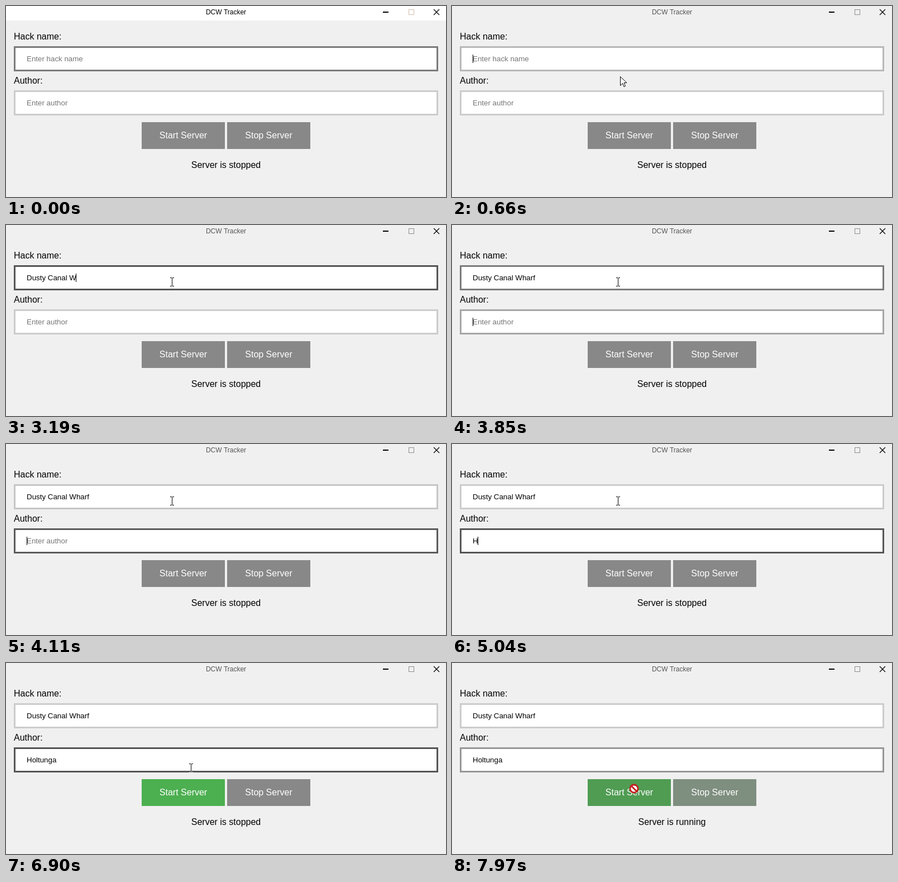
Recreate the animation shown at these times as an HTML page with a canvas. Size 788 by 342 pixels, loop 8 s.

```html
<!DOCTYPE html>
<html lang="en">
<head>
<meta charset="utf-8">
<title>DCW Tracker</title>
<style>
  html, body { margin: 0; width: 100%; height: 100%; overflow: hidden; background: #f0f0f0; }
  canvas { display: block; }
</style>
</head>
<body>
<canvas id="stage" width="788" height="342"></canvas>
<script>
const ctx = document.getElementById('stage').getContext('2d', { alpha: false });
const LOOP = 8000, FADE = 500, BLINK = 530;
const ENABLED = 5040, RUNNING = 7900;

const LIGHT = [204, 204, 204], DARK = [85, 85, 85];
const GRAY = [136, 136, 136], GREEN = [76, 175, 80], HOVER = [69, 160, 73];

// Colour tracks: a first colour, then [start, colour] transitions.
// Typing: one character every `step` ms from `first` on.
const fields = [
  {
    y: 72, label: 'Hack name:', hint: 'Enter hack name', text: 'Dusty Canal Wharf',
    focus: 660, blur: 3745, first: 1790, step: 112,
    border: [DARK, [-105, LIGHT], [590, DARK], [3745, LIGHT]]
  },
  {
    y: 151, label: 'Author:', hint: 'Enter author', text: 'Holtunga',
    focus: 3780, blur: 7810, first: ENABLED, step: 132,
    border: [LIGHT, [3745, DARK], [7810, LIGHT]]
  }
];
const buttons = [
  { x: 243, label: 'Start Server', fill: [GRAY, [ENABLED, GREEN], [6960, HOVER], [RUNNING, GRAY]] },
  { x: 396, label: 'Stop Server', fill: [GRAY, [RUNNING, GREEN]] }
];
// Pointer moves: start, end, from, to
const moves = [
  { start: 70, end: 800, from: [335, 350], to: [297, 102] },
  { start: 6400, end: 7200, from: [297, 102], to: [347, 228] },
  { start: 7260, end: 7500, from: [347, 228], to: [326, 225] }
];

const clamp = p => Math.min(1, Math.max(0, p));
const mix = (a, b, k) => a.map((v, i) => v + (b[i] - v) * k);

// CSS "ease": cubic-bezier(.25, .1, .25, 1)
function ease(p) {
  if (p <= 0) return 0;
  if (p >= 1) return 1;
  const bezier = (a, b, s) => 3 * a * s * (1 - s) ** 2 + 3 * b * s * s * (1 - s) + s ** 3;
  let lo = 0, hi = 1;
  for (let i = 0; i < 24; i++) {
    const mid = (lo + hi) / 2;
    if (bezier(.25, .25, mid) < p) lo = mid; else hi = mid;
  }
  return bezier(.1, 1, lo);
}

function colorAt(t, [first, ...changes]) {
  const rgb = changes.reduce((color, [start, target]) =>
    mix(color, target, ease((t - start) / FADE)), first);
  return `rgb(${rgb.map(Math.round)})`;
}

function rect(x, y, w, h, color) {
  ctx.fillStyle = color;
  ctx.fillRect(x, y, w, h);
}

function write(text, x, y, size, color, align = 'left') {
  ctx.font = `${size}px "Liberation Sans", Arial, sans-serif`;
  ctx.textAlign = align;
  ctx.fillStyle = color;
  ctx.fillText(text, x, y);
}

function line(points, color, width) {
  ctx.beginPath();
  points.forEach(([x, y]) => ctx.lineTo(x, y));
  ctx.strokeStyle = color;
  ctx.lineWidth = width;
  ctx.stroke();
}

function drawTitleBar(t) {
  const active = t < 70;
  if (active) rect(0, 0, 788, 26, '#fff');
  write('DCW Tracker', 394, 15, 12, active ? '#000' : '#555', 'center');
  rect(675, 10, 10, 2, '#000');
  ctx.strokeStyle = active ? '#d2bfae' : '#8c8c8c';
  ctx.lineWidth = 1;
  ctx.strokeRect(721.5, 6.5, 9, 9);
  line([[766, 6], [776, 16]], '#000', 1.2);
  line([[776, 6], [766, 16]], '#000', 1.2);
}

function drawField(t, f) {
  write(f.label, 14, f.y - 12, 16, '#000');
  rect(14, f.y, 760, 45, colorAt(t, f.border));
  rect(17, f.y + 3, 754, 39, '#fff');
  const count = Math.min(f.text.length, Math.max(0, Math.floor((t - f.first) / f.step) + 1));
  const typed = f.text.slice(0, count);
  write(typed || f.hint, 37, f.y + 27, 13.333, typed ? '#000' : '#757575');
  if (t < f.focus || t >= f.blur) return;
  const lastInput = count ? f.first + (count - 1) * f.step : f.focus;
  if (Math.floor((t - lastInput) / BLINK) % 2 === 0)
    rect(37 + Math.floor(ctx.measureText(typed).width), f.y + 15, 1, 15, '#000');
}

function drawButton(t, b) {
  rect(b.x, 208, 149, 48, colorAt(t, b.fill));
  write(b.label, b.x + 74.5, 237, 16, '#fff', 'center');
}

function outline(points) {
  ctx.beginPath();
  points.forEach(([x, y]) => ctx.lineTo(x, y));
  ctx.closePath();
  ctx.fillStyle = '#fff';
  ctx.fill();
  ctx.strokeStyle = '#000';
  ctx.lineWidth = 1;
  ctx.stroke();
}

const pointers = {
  arrow: () => outline([[.5, .5], [.5, 16.5], [4.5, 12.5], [7, 18.5], [9.5, 17.5], [7, 11.5], [12, 11.5]]),
  // The text pointer inverts what lies below it.
  beam() {
    ctx.globalCompositeOperation = 'difference';
    rect(0, -7, 1, 14, '#fff');
    for (const y of [-8, 7]) {
      rect(-3, y, 3, 1, '#fff');
      rect(1, y, 3, 1, '#fff');
    }
  },
  hand: () => outline([[-1.5, .5], [1.5, .5], [1.5, 6.5], [10.5, 10], [10.5, 14],
    [8.5, 20.5], [-1.5, 20.5], [-6.5, 13], [-5, 11], [-1.5, 13]]),
  denied() {
    ctx.beginPath();
    ctx.arc(0, 0, 7, 0, 2 * Math.PI);
    ctx.fillStyle = '#fff';
    ctx.fill();
    ctx.strokeStyle = '#c31f1f';
    ctx.lineWidth = 2.8;
    ctx.stroke();
    line([[-5, -5], [5, 5]], '#c31f1f', 2.8);
  }
};

function pointerAt(x, y, t) {
  if (fields.some(f => y >= f.y && y < f.y + 45)) return pointers.beam;
  const over = buttons.find(b => x >= b.x && x < b.x + 149 && y >= 208 && y < 256);
  if (!over) return pointers.arrow;
  const enabled = over === buttons[0] && t >= ENABLED && t < RUNNING;
  return enabled ? pointers.hand : pointers.denied;
}

function drawPointer(t) {
  const move = moves.findLast(m => t >= m.start);
  if (!move) return;
  const k = clamp((t - move.start) / (move.end - move.start));
  const smooth = k * k * (3 - 2 * k);
  const [x, y] = mix(move.from, move.to, smooth).map(Math.round);
  ctx.save();
  ctx.translate(x, y);
  pointerAt(x, y, t)();
  ctx.restore();
}

function draw(now) {
  const t = now % LOOP;
  rect(0, 0, 788, 342, '#f0f0f0');
  drawTitleBar(t);
  fields.forEach(f => drawField(t, f));
  buttons.forEach(b => drawButton(t, b));
  write(t < RUNNING ? 'Server is stopped' : 'Server is running', 394, 290, 16, '#000', 'center');
  drawPointer(t);
}

let begin;
function tick(now) {
  begin ??= now;
  draw(now - begin);
  requestAnimationFrame(tick);
}
draw(0);
requestAnimationFrame(tick);
</script>
</body>
</html>
```
